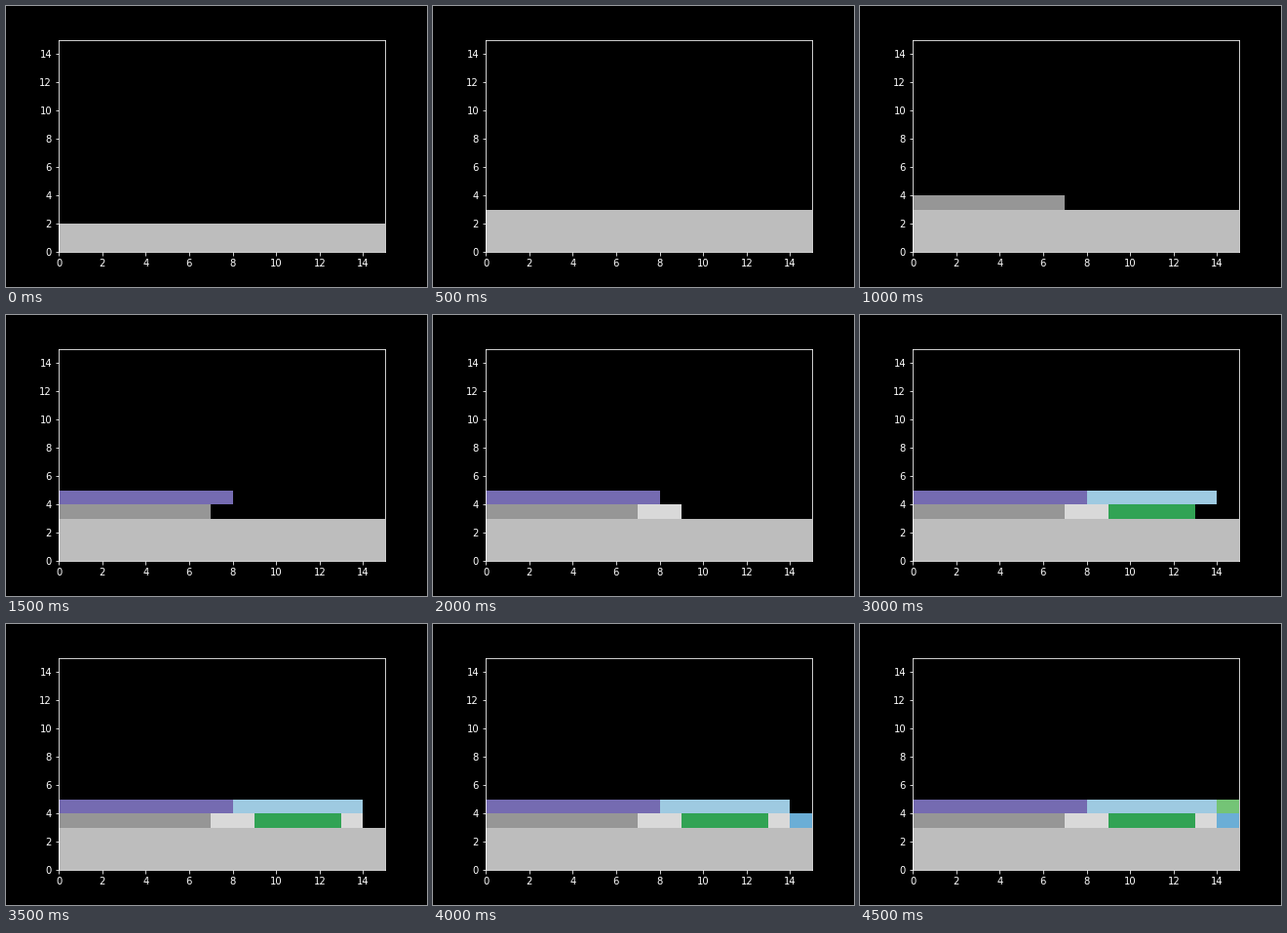
Animation, 432 px wide and 288 px high, one loop 5 s. Source, as a matplotlib script:

```python
import matplotlib.pyplot as plt
from matplotlib.animation import FuncAnimation
from matplotlib.patches import Rectangle

STEP_MS = 500
SIZE = 15

# One block per step: x, y, width, height, colour
BLOCKS = [
    (0, 0, 15, 2, "#bdbdbd"),
    (0, 2, 15, 1, "#bdbdbd"),
    (0, 3, 7, 1, "#969696"),
    (0, 4, 8, 1, "#756bb1"),
    (7, 3, 2, 1, "#d9d9d9"),
    (8, 4, 6, 1, "#9ecae1"),
    (9, 3, 4, 1, "#31a354"),
    (13, 3, 1, 1, "#d9d9d9"),
    (14, 3, 1, 1, "#6baed6"),
    (14, 4, 1, 1, "#74c476"),
]

plt.rcParams.update({
    "font.family": "DejaVu Sans",
    "font.size": 10,
    "figure.facecolor": "black",
    "savefig.facecolor": "black",
    "axes.facecolor": "black",
    "axes.edgecolor": "white",
    "xtick.color": "white",
    "ytick.color": "white",
})

fig = plt.figure(figsize=(6, 4), dpi=72)
fig.subplots_adjust(left=0.125, right=0.9, bottom=0.125, top=0.88)
ax = fig.add_subplot()
ax.set_xlim(0, SIZE)
ax.set_ylim(0, SIZE)
ax.set_xticks(range(0, SIZE, 2))
ax.set_yticks(range(0, SIZE, 2))

patches = [
    ax.add_patch(Rectangle((x, y), w, h, facecolor=color, linewidth=0))
    for x, y, w, h, color in BLOCKS
]


def update(step):
    for i, patch in enumerate(patches):
        patch.set_visible(i <= step)
    return patches


def init():
    return update(0)


anim = FuncAnimation(fig, update, frames=len(BLOCKS), init_func=init,
                     interval=STEP_MS, repeat=True, repeat_delay=0)

plt.show()
```
